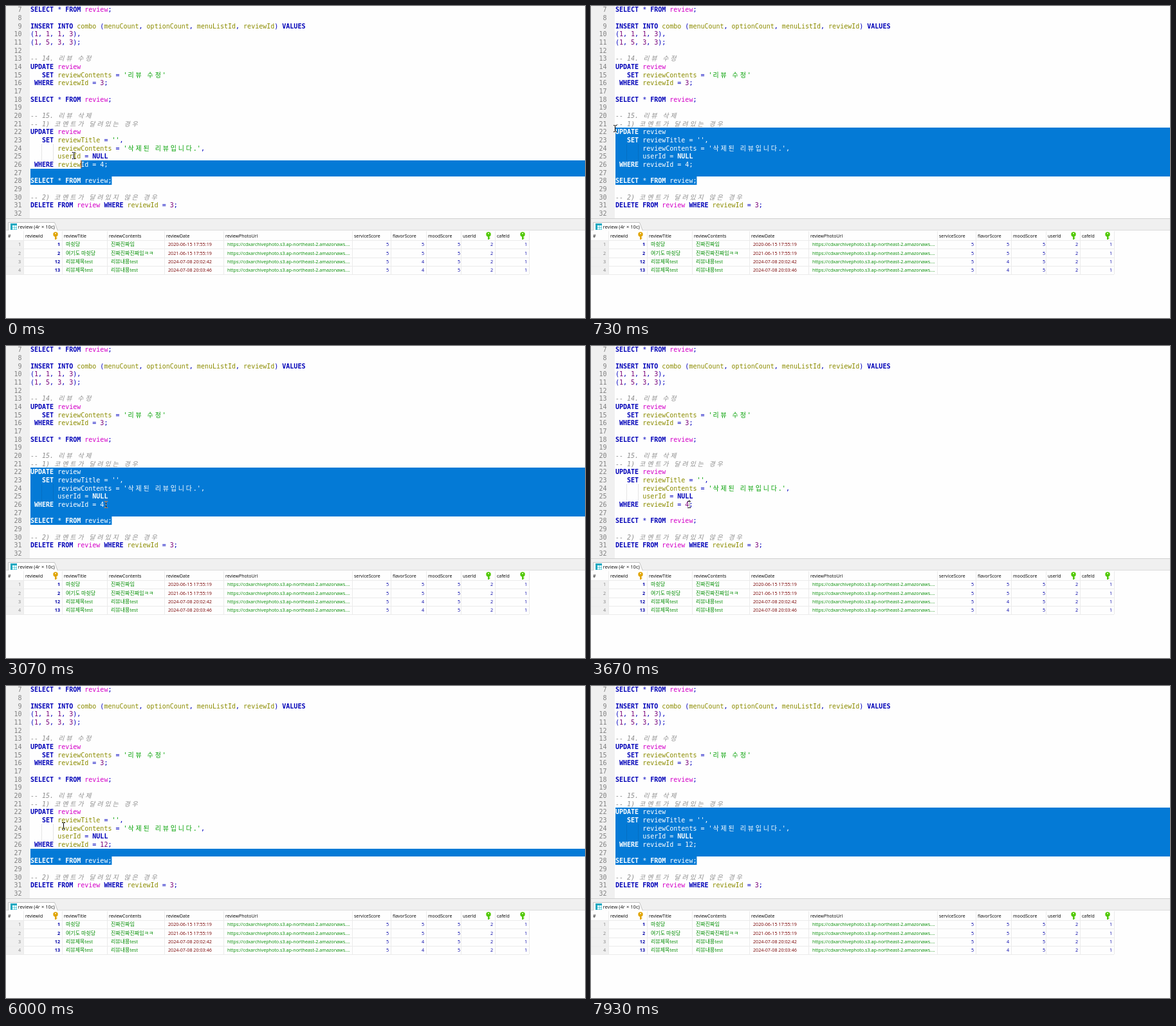
Animation, 900 px wide and 485 px high, one loop 8000 ms. Source, as an HTML page with a canvas:

```html
<!DOCTYPE html>
<html lang="ko">
<head>
<meta charset="utf-8">
<title>SQL editor</title>
<style>
html, body { margin: 0; width: 100%; height: 100%; overflow: hidden; background: #fefefe; }
canvas { display: block; }
</style>
</head>
<body>
<canvas id="stage" width="900" height="485"></canvas>
<script>
const ctx = document.getElementById('stage').getContext('2d');
const LOOP = 8000, STEP = 1000 / 15;
const LEFT = 38, CELL = 6.02, PITCH = 12.667, FIRST = 7;
const MONO = '"DejaVu Sans Mono", "Noto Sans CJK KR", monospace';
const SANS = '"Open Sans", "Noto Sans CJK KR", sans-serif';
const HANGUL = /[\u3131-\u318e\uac00-\ud7a3]/;
const PAPER = '#fefefe', PANEL = '#f0f0f0', RULE = '#ebebeb', SELECTED = '#047ad6';
const INK = {
  comment: '#8e8e8e', string: '#00a000', keyword: '#0000b8', table: '#d400c8',
  number: '#780078', name: '#8c8c00', symbol: '#0000c0'
};

const code = [
  'SELECT * FROM review;',
  '',
  'INSERT INTO combo (menuCount, optionCount, menuListId, reviewId) VALUES',
  '(1, 1, 1, 3),',
  '(1, 5, 3, 3);',
  '',
  '-- 14. 리뷰 수정',
  'UPDATE review',
  "   SET reviewContents = '리뷰 수정'",
  ' WHERE reviewId = 3;',
  '',
  'SELECT * FROM review;',
  '',
  '-- 15. 리뷰 삭제',
  '-- 1) 코멘트가 달려있는 경우',
  'UPDATE review',
  "   SET reviewTitle = '',",
  "       reviewContents = '삭제된 리뷰입니다.',",
  '       userId = NULL',
  ' WHERE reviewId = 4;',
  '',
  'SELECT * FROM review;',
  '',
  '-- 2) 코멘트가 달려있지 않은 경우',
  'DELETE FROM review WHERE reviewId = 3;',
  ''
];
const EDITED = 26, SEL_END = { line: 28, col: 21 };

// time, x, y of the pointer
const path = [
  [-70, 116, 246], [0, 105, 232], [130, 72, 212], [330, 44, 195], [530, 38, 191],
  [735, 37, 190], [870, 30, -14], [1350, 30, -14], [1750, 105, 140], [2300, 153, 240],
  [2600, 155, 246], [3300, 155, 246], [3500, 152, 246], [5150, 152, 246],
  [5450, 166, 272], [5750, 166, 272], [5933, 122, 258], [6000, 89, 217],
  [6200, 58, 202], [6500, 40, 197], [6935, 40, 197], [7300, 32, -14], [8000, 32, -14]
];
const CLICK = 3200, DRAG = 5750;

const lineTop = n => Math.round((n - FIRST) * PITCH - 0.8);
const cells = s => [...s].reduce((n, c) => n + (HANGUL.test(c) ? 2 : 1), 0);
const clamp = (v, lo, hi) => Math.max(lo, Math.min(hi, v));

function pointer(t) {
  const i = clamp(path.findIndex(p => p[0] > t), 1, path.length - 1);
  const [t0, x0, y0] = path[i - 1], [t1, x1, y1] = path[i];
  const k = clamp((t - t0) / (t1 - t0), 0, 1);
  return { x: x0 + (x1 - x0) * k, y: y0 + (y1 - y0) * k };
}

function lineText(n, t) {
  if (n !== EDITED) return code[n - FIRST];
  const id = t < 3900 ? '4' : t < 4070 ? '' : t < 4240 ? '1' : '12';
  return ` WHERE reviewId = ${id};`;
}

function hit(p, t) {
  const line = clamp(Math.floor((p.y + 0.8) / PITCH) + FIRST, 22, 28);
  const col = clamp(Math.round((p.x - LEFT) / CELL), 0, cells(lineText(line, t)));
  return { line, col };
}

// The selection follows the pointer one step late
function selectionStart(t) {
  if (t >= CLICK && t < DRAG) return null;
  const held = t < CLICK ? Math.min(t, 735) : Math.min(t, 6935);
  return hit(pointer(held - STEP), t);
}

function caretAt(t) {
  if (t < 200) return selectionStart(t);
  if (t < CLICK || t >= DRAG) return null;
  const edits = [CLICK, 3900, 4070, 4240];
  const last = edits.filter(e => e <= t).pop();
  if ((t - last) % 1066 >= 533) return null;
  return { line: EDITED, col: cells(lineText(EDITED, t)) - 1 };
}

function tokens(s) {
  const re = /--.*|'[^']*'|[A-Za-z]+|\d+|[^\sA-Za-z\d']/g;
  return [...s.matchAll(re)].map(m => {
    const w = m[0];
    const kind = w.startsWith('--') ? 'comment' : w[0] === "'" ? 'string'
      : /^[A-Z]+$/.test(w) ? 'keyword' : w === 'review' ? 'table'
      : /^[a-z]/i.test(w) ? 'name' : /^\d/.test(w) ? 'number' : 'symbol';
    return { w, kind, col: cells(s.slice(0, m.index)) };
  });
}

function codeLine(n, t, white) {
  const y = (n - FIRST) * PITCH + 9.3;
  for (const { w, kind, col } of tokens(lineText(n, t))) {
    const style = kind === 'keyword' ? 'bold ' : kind === 'comment' ? 'italic ' : '';
    ctx.font = `${style}10px ${MONO}`;
    ctx.fillStyle = white ? '#fff' : INK[kind];
    let x = LEFT + col * CELL;
    for (const run of w.match(/[\u3131-\u318e\uac00-\ud7a3]|[^\u3131-\u318e\uac00-\ud7a3]+/g)) {
      const wide = HANGUL.test(run);
      ctx.fillText(run, x + (wide ? 1 : 0), y);
      x += cells(run) * CELL;
    }
  }
}

function codeBlock(t, white) {
  for (let n = FIRST; n < FIRST + code.length; n++) codeLine(n, t, white);
  ctx.fillStyle = white ? '#0664b0' : '#cccccc';
  for (const x of [55, 73])
    for (let y = lineTop(24); y < lineTop(26); y += 2) ctx.fillRect(x, y, 1, 1);
}

function editor(t) {
  box(0, 0, 37, 330, PANEL);
  ctx.font = `10px ${MONO}`;
  ctx.fillStyle = '#808080';
  ctx.textAlign = 'right';
  for (let n = FIRST; n <= 32; n++) ctx.fillText(n, 24.5, (n - FIRST) * PITCH + 9.3);
  ctx.textAlign = 'left';
  codeBlock(t, false);

  const start = selectionStart(t);
  if (!start) return;
  ctx.save();
  ctx.beginPath();
  for (let n = start.line; n <= SEL_END.line; n++) {
    const x = LEFT + (n === start.line ? start.col * CELL : 0);
    const right = n === SEL_END.line ? LEFT + SEL_END.col * CELL : 900;
    ctx.rect(x, lineTop(n), right - x, lineTop(n + 1) - lineTop(n));
  }
  ctx.clip();
  box(0, 0, 900, 330, SELECTED);
  codeBlock(t, true);
  ctx.restore();
}

function box(x, y, w, h, color) {
  ctx.fillStyle = color;
  ctx.fillRect(x, y, w, h);
}

// Latin and Hangul runs share a line but differ in size
function label(s, x, y, color, { size = 7.2, right = false, weight = 500 } = {}) {
  const runs = String(s).match(/[\u3131-\u318e\uac00-\ud7a3]+|[^\u3131-\u318e\uac00-\ud7a3]+/g);
  ctx.fillStyle = color;
  ctx.textAlign = right ? 'right' : 'left';
  for (const run of runs) {
    ctx.font = `${weight} ${HANGUL.test(run) ? 8 : size}px ${SANS}`;
    ctx.fillText(run, x, y);
    x += ctx.measureText(run).width;
  }
  ctx.textAlign = 'left';
}

function key(x, color) {
  ctx.fillStyle = color;
  ctx.beginPath();
  ctx.arc(x, 355, 3.7, 0, Math.PI * 2);
  ctx.fill();
  ctx.fillRect(x - 1, 357, 2.2, 6);
  ctx.fillRect(x + 1, 360, 1.4, 1.4);
  box(x - 1, 353, 2, 1.4, PAPER);
}

function tab() {
  box(0, 330, 900, 19, PANEL);
  box(0, 330, 900, 1, '#d0d0d0');
  box(0, 348, 900, 1, '#dcdcdc');
  ctx.beginPath();
  ctx.moveTo(3.5, 349.5);
  ctx.lineTo(3.5, 336.5);
  ctx.lineTo(75.5, 336.5);
  ctx.lineTo(80.5, 349.5);
  ctx.fillStyle = PAPER;
  ctx.fill();
  ctx.strokeStyle = '#c4c4c4';
  ctx.lineWidth = 1;
  ctx.stroke();
  box(7, 338, 10, 10, '#20a8c0');
  for (let i = 0; i < 2; i++)
    for (let j = 0; j < 2; j++) box(10 + i * 3.5, 341 + j * 3.5, 3, 3, '#e4ffff');
  label('review (4r × 10c)', 18.5, 346, '#101010', { size: 7.6 });
}

const heads = [
  ['#', 3], ['reviewId', 30], ['reviewTitle', 90], ['reviewContents', 160],
  ['reviewDate', 249], ['reviewPhotoUrl', 341], ['serviceScore', 541],
  ['flavorScore', 601], ['moodScore', 656], ['userId', 710], ['cafeId', 763]
];
const URL_TEXT = 'https://cdxarchivephoto.s3.ap-northeast-2.amazonaws....';
const rows = [
  [1, '마쉿당', '진짜진짜임', '2020-06-15 17:55:19', 5],
  [2, '여기도 마쉿당', '진짜진짜진짜임ㅋㅋ', '2021-06-15 17:55:19', 5],
  [12, '리뷰제목test', '리뷰내용test', '2024-07-08 20:02:42', 4],
  [13, '리뷰제목test', '리뷰내용test', '2024-07-08 20:03:46', 4]
];

function grid() {
  const green = '#008c00', blue = '#0000a8', red = '#780000';
  box(0, 349, 900, 136, PAPER);
  box(0, 364, 27, 53, PANEL);
  for (const [name, x] of heads) {
    label(name, x, 359.5, '#000', { size: 7 });
    if (x > 3) box(x - 3, 350, 1, 67, RULE);
  }
  box(813, 350, 1, 67, RULE);
  key(77, '#e0a400');
  key(750, '#50c800');
  key(803, '#50c800');
  for (let i = 0; i <= 4; i++) box(0, Math.round(364 + i * 13.3), 813, 1, RULE);
  rows.forEach(([id, title, text, date, flavor], i) => {
    const y = 373.3 + i * 13.3;
    label(i + 1, 23, y, '#808080', { right: true });
    label(id, 84, y, blue, { right: true, weight: 700 });
    label(title, 93, y, green);
    label(text, 163, y, green);
    label(date, 252, y, red);
    label(URL_TEXT, 344, y, green);
    [[5, 595], [flavor, 650], [5, 706], [2, 757], [1, 810]]
      .forEach(([v, x]) => label(v, x, y, blue, { right: true }));
  });
}

function overlays(t) {
  ctx.globalCompositeOperation = 'difference';
  const caret = caretAt(t);
  if (caret) box(Math.round(LEFT + caret.col * CELL), lineTop(caret.line), 1.4, 12, '#fff');
  const p = pointer(t), x = Math.round(p.x), y = Math.round(p.y);
  box(x, y - 4, 1, 9, '#fff');
  for (const dy of [-5, 5]) {
    box(x - 2, y + dy, 2, 1, '#fff');
    box(x + 1, y + dy, 2, 1, '#fff');
  }
  ctx.globalCompositeOperation = 'source-over';
}

function draw(now) {
  const t = Math.floor(((now % LOOP) + 4) / STEP) * STEP % LOOP;
  box(0, 0, 900, 485, PAPER);
  editor(t);
  tab();
  grid();
  overlays(t);
}

const began = performance.now();
function tick() {
  draw(performance.now() - began);
  requestAnimationFrame(tick);
}
tick();
</script>
</body>
</html>
```
